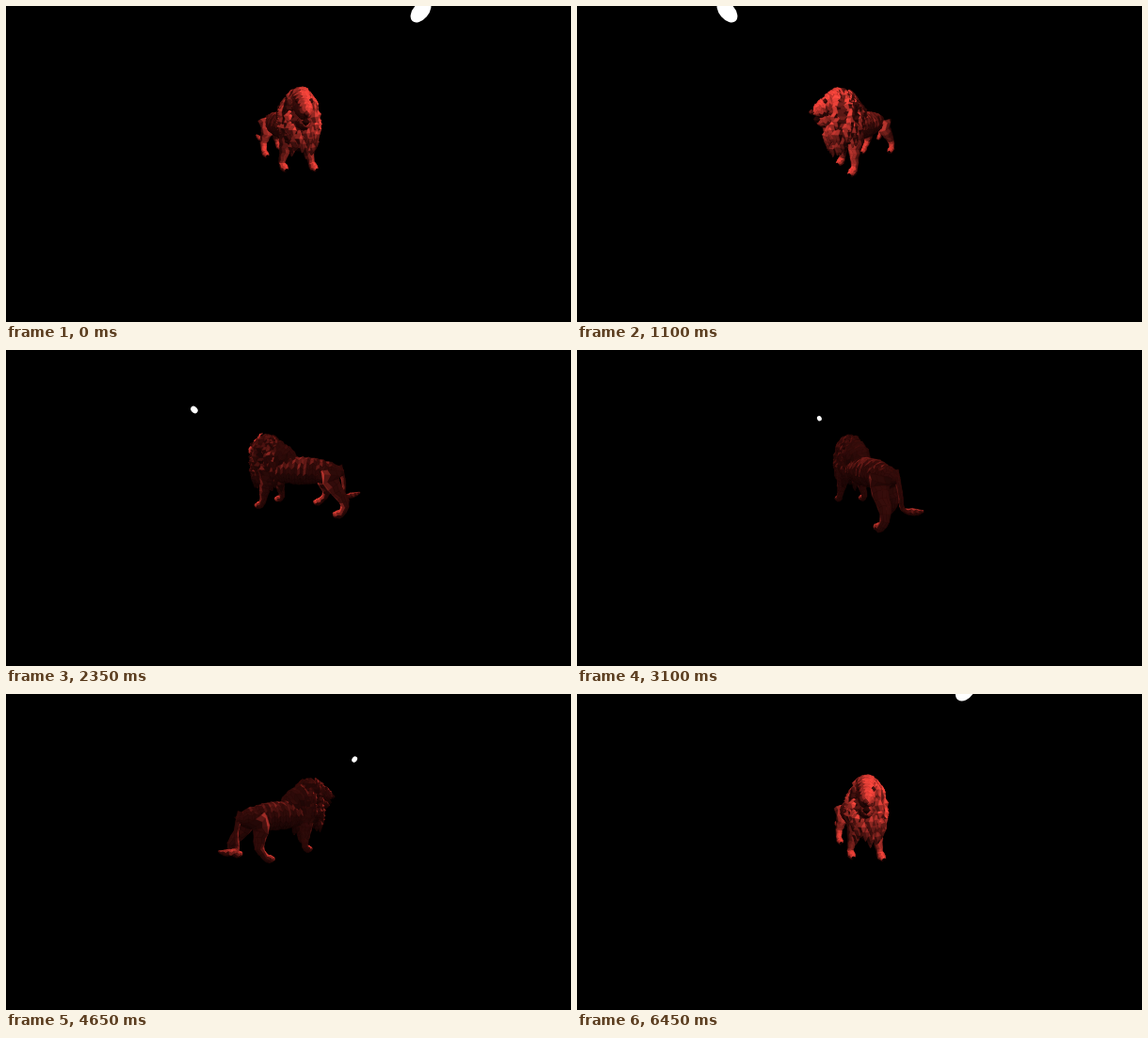
Write an HTML page with a canvas that moves like this. It is 600 px wide and 336 px high and loops after 6.5 s.

```html
<!DOCTYPE html>
<html>
<head>
<meta charset="utf-8">
<style>
html, body { margin: 0; width: 100%; height: 100%; overflow: hidden; background: #000; }
canvas { display: block; }
</style>
</head>
<body>
<canvas id="stage" width="600" height="336"></canvas>
<script>
const ctx = document.getElementById('stage').getContext('2d');
const LOOP = 6500, STEP = 50;
const FOCAL = 166, DIST = 17.9, PITCH = 0.3925;
const SIN = Math.sin(PITCH), COS = Math.cos(PITCH);
const LAMP = [10, 10.06, 0], LAMP_R = 0.31;

let seed = 7;
const rnd = () => (seed = seed * 16807 % 2147483647) / 2147483647;
const clamp = (v, lo, hi) => Math.min(hi, Math.max(lo, v));
const add = (a, b, k = 1) => a.map((v, i) => v + b[i] * k);
const sub = (a, b) => add(a, b, -1);
const dot = (a, b) => a[0] * b[0] + a[1] * b[1] + a[2] * b[2];
const cross = (a, b) => [a[1] * b[2] - a[2] * b[1], a[2] * b[0] - a[0] * b[2], a[0] * b[1] - a[1] * b[0]];
const unit = a => { const l = Math.hypot(...a) || 1; return a.map(v => v / l); };

// Points are [forward, up, side, radius]
const span = (a, b, n, radius) => Array.from({ length: n + 1 }, (_, i) =>
  [...add(a, sub(b, a), i / n), radius(i / n)]);

// Catmull-Rom through the points
function sample(pts, t) {
  const n = pts.length - 1;
  const i = clamp(Math.floor(t), 0, n - 1), s = t - i;
  const [a, b, c, d] = [-1, 0, 1, 2].map(k => pts[clamp(i + k, 0, n)]);
  return b.map((v, k) => v + s / 2 * (c[k] - a[k] +
    s * (2 * a[k] - 5 * v + 4 * c[k] - d[k] + s * (3 * (v - c[k]) + d[k] - a[k]))));
}

const faces = [];

// The lamp travels with the figure, so each face keeps one colour
function addFace(pts, axis, tone) {
  const mid = pts.reduce((sum, p) => add(sum, p)).map(v => v / 4);
  let normal = unit(cross(sub(pts[2], pts[0]), sub(pts[3], pts[1])));
  if (dot(normal, sub(mid, axis)) < 0) normal = normal.map(v => -v);
  const lit = Math.max(0, dot(normal, unit(sub(LAMP, mid)))) * tone;
  const amb = (0.75 + 0.35 * normal[1]) * (0.4 + 0.6 * tone);
  const rgb = [205 * lit + 60 * amb, 61 * lit + 14 * amb, 53 * lit + 12 * amb];
  faces.push({ pts, mid, normal, color: `rgb(${rgb.map(Math.round)})` });
}

function tube(pts, { sides = 10, steps = 2, wide = 1, tone = 1, bump = 0.08 } = {}) {
  const rings = [], axis = [], count = (pts.length - 1) * steps;
  for (let i = 0; i <= count; i++) {
    const t = i / steps, p = sample(pts, t), c = p.slice(0, 3), r = Math.max(0.02, p[3]);
    const dir = unit(sub(sample(pts, t + 0.02), sample(pts, t - 0.02)).slice(0, 3));
    const n = unit(cross(dir, [0, 0, 1])), b = cross(dir, n);
    axis.push(c);
    rings.push(Array.from({ length: sides }, (_, j) => {
      const a = (j + i % 2 / 2) / sides * 2 * Math.PI, k = r * (1 + bump * (rnd() * 2 - 1));
      return add(add(c, n, k * Math.cos(a)), b, k * wide * Math.sin(a));
    }));
  }
  for (let i = 0; i < count; i++) for (let j = 0; j < sides; j++) {
    const k = (j + 1) % sides;
    addFace([rings[i][j], rings[i][k], rings[i + 1][k], rings[i + 1][j]],
      add(axis[i], axis[i + 1]).map(v => v / 2), tone);
  }
}

const round = (t, power = 0.5) => Math.max(0.02, Math.sin(Math.PI * t)) ** power;

function ball(c, r, tone) {
  const up = [0, r, 0];
  tube(span(sub(c, up), add(c, up), 4, t => r * round(t, 1)), { sides: 6, steps: 1, tone, bump: 0 });
}

// A thick thigh tapers to the ankle, then the toes point forward
function leg(hip, foot, bend) {
  const ankle = add(foot, [-0.45, 0.4, 0]);
  const shin = span(hip, ankle, 4, t => 0.32 + 0.7 * (1 - t) ** 1.4)
    .map((p, i) => add(p, [bend * Math.sin(i * Math.PI / 2), 0, 0, 0]));
  tube([...shin, [...foot, 0.4], [...add(foot, [0.45, -0.08, 0]), 0.2]], { tone: 0.95 });
}

// Trunk and neck
tube(span([-5.45, 4.25, 0.1], [3.05, 4.2, -0.3], 10, t => (1.2 + 0.3 * t) * round(t, 0.4)),
  { sides: 16, steps: 3, bump: 0.06, tone: 0.8 });
tube(span([-0.9, 4.6, -0.1], [2.6, 6.3, -0.35], 4, t => 0.6 + 0.8 * round(t * 0.8, 1)),
  { sides: 14, steps: 3, bump: 0.12, tone: 0.75 });

leg([-4.3, 4.4, 0.7], [-5.3, 0.48, 1.65], 0.35);
leg([-4, 4.4, -0.6], [-3.2, 0.48, -1.4], 0.35);
leg([2, 4.2, 0.7], [3.1, 0.48, 1.1], 0);
leg([1.6, 4.2, -0.9], [1.6, 0.48, -1.5], 0);

// Tail
tube([[-5, 4.9, 0, 0.25], [-5.65, 3.2, -0.1, 0.18], [-5.85, 1.8, -0.4, 0.18],
  [-6.8, 1.8, -0.75, 0.28], [-7.45, 2.08, -0.85, 0.06]], { sides: 7, steps: 4 });

// Head and jaw, turned a little aside
tube(span([2.4, 6.85, -0.45], [4.85, 5.75, -1.4], 8, t => (1.05 - 0.5 * t) * Math.sqrt(1 - t ** 7)),
  { sides: 12, wide: 0.88 });
tube(span([3.2, 5.2, -0.75], [4.6, 4.95, -1.3], 4, t => 0.55 * round(0.3 + 0.7 * t)), { tone: 0.65 });
for (const s of [-1, 1]) ball([3.95 + 0.25 * s, 6.72, -1.02 + 0.43 * s], 0.17, 0.25);
ball([4.9, 5.88, -1.5], 0.2, 0.4);
ball([4.6, 5.3, -1.3], 0.27, 0.1);

// Mane: a dark core covered with hanging tufts
const MANE = [2.3, 5, -0.3], MANE_H = 2.7;
const maneR = y => 1.75 * Math.sqrt(Math.max(0.02, 1 - Math.abs((y - MANE[1]) / MANE_H) ** 2.4));
const crown = [0, MANE_H, 0];
tube(span(sub(MANE, crown), add(MANE, crown), 10, t => 0.95 * maneR(MANE[1] + MANE_H * (2 * t - 1))),
  { sides: 14, wide: 0.92, tone: 0.45 });
for (let i = 0; i < 170; i++) {
  const a = rnd() * 2 * Math.PI, y = 3.2 + 4.3 * rnd();
  const toFace = Math.abs(Math.atan2(Math.sin(a + 0.48), Math.cos(a + 0.48)));
  if (toFace < 0.65 && y > 4.9) continue;
  const r = maneR(y) * 0.93, length = 0.8 + 0.6 * rnd();
  const at = (out, drop, w) =>
    [...add(MANE, [Math.cos(a) * (r + out), y - drop - MANE[1], Math.sin(a) * (r + out) * 0.92]), w];
  tube([at(-0.1, -0.1, 0.1), at(0.14, length * 0.4, 0.33), at(0.24, length, 0.03)],
    { sides: 5, bump: 0.25, tone: clamp((y - 1) / 4.6, 0.5, 1) * (0.75 + 0.4 * rnd()) });
}

function draw(ms) {
  const turn = 0.55 - ms / 1000, s = Math.sin(turn), c = Math.cos(turn);
  const eye = [DIST * COS * c, DIST * SIN, -DIST * COS * s];
  const project = ([u, y, w]) => {
    const x = u * s + w * c, z = u * c - w * s;
    const depth = DIST - z * COS - y * SIN;
    return [300 + FOCAL * x / depth, 168 - FOCAL * (y * COS - z * SIN) / depth, depth];
  };

  ctx.fillStyle = '#000';
  ctx.fillRect(0, 0, 600, 336);

  const shown = [];
  for (const f of faces) {
    const view = sub(eye, f.mid);
    if (dot(f.normal, view) > 0) shown.push([dot(view, view), f]);
  }
  shown.sort((a, b) => b[0] - a[0]);
  ctx.lineWidth = 0.5;
  for (const [, f] of shown) {
    ctx.beginPath();
    for (const p of f.pts) {
      const [x, y] = project(p);
      ctx.lineTo(x, y);
    }
    ctx.closePath();
    ctx.fillStyle = ctx.strokeStyle = f.color;
    ctx.fill();
    ctx.stroke();
  }

  // Wide-angle perspective stretches the lamp away from the centre
  const [x, y, depth] = project(LAMP), r = FOCAL * LAMP_R / depth;
  const dx = x - 300, dy = y - 168;
  ctx.fillStyle = '#fff';
  ctx.beginPath();
  ctx.ellipse(x, y, r * Math.hypot(1, Math.hypot(dx, dy) / FOCAL), r, Math.atan2(dy, dx), 0, 2 * Math.PI);
  ctx.fill();
}

let last = -1;
function tick() {
  const ms = Math.floor(performance.now() % LOOP / STEP) * STEP;
  if (ms !== last) draw(last = ms);
  requestAnimationFrame(tick);
}
tick();
</script>
</body>
</html>
```
